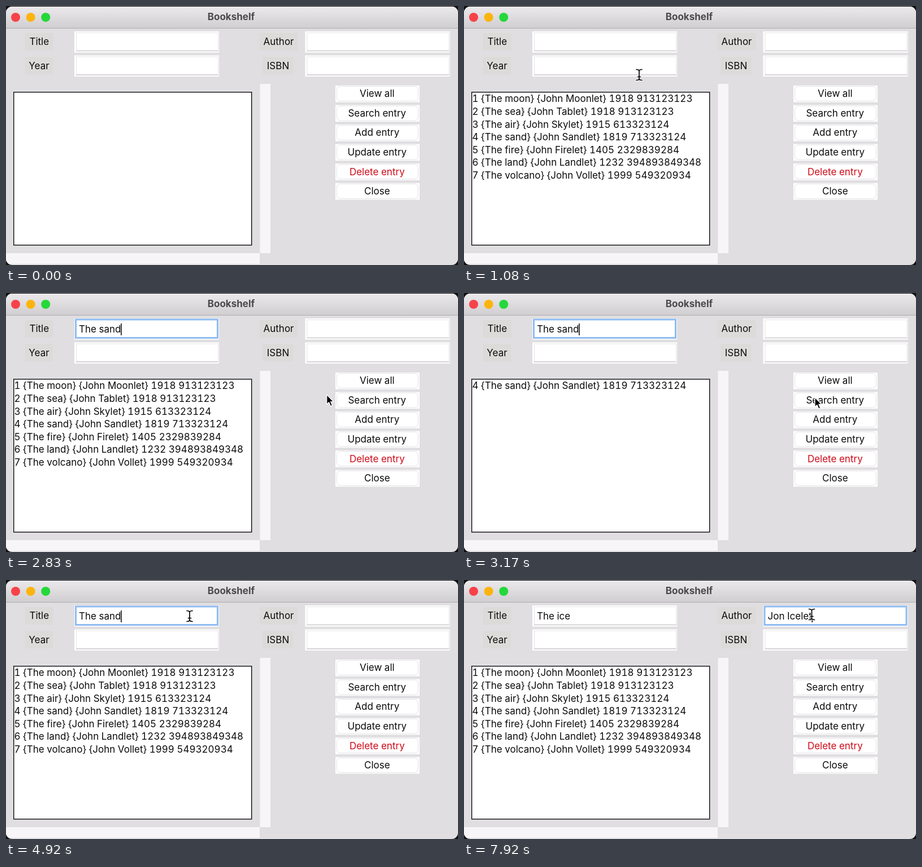
Animation, 800 px wide and 459 px high, one loop 8000 ms. Source, as an HTML page:

```html
<!DOCTYPE html>
<html lang="en">
<head>
<meta charset="utf-8">
<title>Bookshelf</title>
<style>
  html, body { margin: 0; width: 100%; height: 100%; overflow: hidden; background: #111; }
  svg { display: block; width: 800px; height: 459px; }
  text {
    font: 17px Inter, "Open Sans", sans-serif;
    font-variant-numeric: tabular-nums;
    font-feature-settings: "calt" 0;
    fill: #0b0b0b;
    white-space: pre;
  }
  .mid { text-anchor: middle; }
  .title { font-weight: 700; fill: #4b494b; }
  .danger { fill: #cf0a18; }
</style>
</head>
<body>
<svg id="stage" viewBox="0 0 800 459">
  <defs>
    <linearGradient id="bar" x2="0" y2="1">
      <stop offset="0" stop-color="#ebe9eb"/>
      <stop offset="1" stop-color="#d0ced0"/>
    </linearGradient>
    <clipPath id="frame"><rect y="1" width="800" height="458" rx="11"/></clipPath>
  </defs>
</svg>
<script>
const NS = "http://www.w3.org/2000/svg";
const stage = document.getElementById("stage");
const LOOP = 8000, STEP = 1000 / 12;

function add(parent, tag, attrs, content) {
  const el = document.createElementNS(NS, tag);
  for (const key in attrs) el.setAttribute(key, attrs[key]);
  if (content !== undefined) el.textContent = content;
  parent.appendChild(el);
  return el;
}
const rect = (parent, x, y, width, height, fill, more) =>
  add(parent, "rect", { x, y, width, height, fill, ...more });
const label = (parent, x, y, content, cls = "") =>
  add(parent, "text", { x, y, class: cls }, content);
const show = (el, on) => el.setAttribute("visibility", on ? "visible" : "hidden");

// Window
const win = add(stage, "g", { "clip-path": "url(#frame)" });
rect(win, 0, 0, 800, 459, "#e0dee1");
rect(win, 0, 1, 800, 38, "url(#bar)");
rect(win, 0, 39, 800, 1, "#aeacae");
["#f7424a", "#fcb40d", "#24d83a"].forEach((fill, i) =>
  add(win, "circle", { cx: 17 + i * 26.6, cy: 20, r: 8, fill }));
label(win, 398.5, 25, "Bookshelf", "mid title");

// Form
function makeField(x, y, name, cx, half) {
  rect(win, cx - half, y + 3, half * 2, 31, "#dddbd9");
  label(win, cx, y + 24.3, name, "mid");
  rect(win, x, y, 256, 37.5, "#fff");
  const plain = add(win, "g", {});
  rect(plain, x + 3.5, y + 2.5, 251, 32, "none", { stroke: "#e7e5e7" });
  rect(plain, x + 3, y + 34, 252, 1, "#bab8ba");
  const ring = rect(win, x + 2.5, y + 2, 251, 32.5, "#fff",
    { stroke: "#8fbcf2", "stroke-width": 3 });
  const text = label(win, x + 8, y + 25.3, "");
  const caret = rect(win, 0, y + 9, 1.5, 21, "#000");
  return {
    draw(value, focused, caretOn) {
      text.textContent = value;
      show(plain, !focused);
      show(ring, focused);
      show(caret, focused && caretOn);
      const end = value ? text.getComputedTextLength() : 0;
      caret.setAttribute("x", x + 7.7 + end);
    }
  };
}
const titleField = makeField(121, 45, "Title", 58.8, 25);
const authorField = makeField(529.5, 45, "Author", 482.5, 34);
const yearField = makeField(121, 87.5, "Year", 58.5, 25);
const isbnField = makeField(529.5, 87.5, "ISBN", 481.5, 27);
yearField.draw("", false, false);
isbnField.draw("", false, false);

// List and scroll bars
rect(win, 449.5, 138, 18.5, 300, "#f7f5f7");
rect(win, 0, 438, 449, 19, "#f7f5f7");
rect(win, 13.7, 152.7, 421, 271, "#fff", { stroke: "#0b0b0b", "stroke-width": 1.4 });
const books = [
  "1 {The moon} {John Moonlet} 1918 913123123",
  "2 {The sea} {John Tablet} 1918 913123123",
  "3 {The air} {John Skylet} 1915 613323124",
  "4 {The sand} {John Sandlet} 1819 713323124",
  "5 {The fire} {John Firelet} 1405 2329839284",
  "6 {The land} {John Landlet} 1232 394893849348",
  "7 {The volcano} {John Vollet} 1999 549320934"
];
const rows = books.map((_, i) => label(win, 14.5, 170.3 + i * 22.6, ""));

// Buttons
["View all", "Search entry", "Add entry", "Update entry", "Delete entry", "Close"]
  .forEach((name, i) => {
    const y = 141 + i * 34.55;
    rect(win, 583, y, 149, 29.5, "#fff");
    rect(win, 585.5, y + 1.5, 144, 26, "none", { rx: 6, stroke: "#e4e2e4" });
    label(win, 656.8, y + 20.3, name, "mid" + (name.startsWith("Delete") ? " danger" : ""));
  });

// Pointers
const arrow = add(stage, "path", {
  d: "M0 0V17L3.9 13.4L6.9 20.2L9.8 18.9L6.9 12.2H12Z",
  fill: "#000", stroke: "#fff", "stroke-width": 1.3, "stroke-linejoin": "round"
});
const beam = add(stage, "g", { fill: "none", "stroke-linecap": "round" });
[["#fff", 3.6], ["#000", 1.7]].forEach(([stroke, width]) =>
  add(beam, "path", {
    d: "M-5 -9.5Q0 -9.5 0 -6.5Q0 -9.5 5 -9.5M0 -6.5V6.5M-5 9.5Q0 9.5 0 6.5Q0 9.5 5 9.5M-2.5 3.5H2.5",
    stroke, "stroke-width": width
  }));

// Pointer stops: step, x, y
const path = [
  [1, 742, 423], [4, 705, 290], [8, 660, 158], [11, 650, 152], [13, 310, 122],
  [16, 249, 50], [28, 249, 50], [33, 541, 178], [36, 621, 185], [41, 621, 185],
  [46, 622, 201], [48, 624, 198], [50, 645, 154], [52, 645, 154], [57, 330, 67],
  [59, 325, 64], [74, 325, 64], [76, 450, 84], [78, 615.5, 61], [96, 615.5, 61]
];
function pointerAt(n) {
  const i = Math.max(1, path.findIndex(p => p[0] >= n));
  const [a, ax, ay] = path[i - 1], [b, bx, by] = path[i];
  const u = (n - a) / (b - a);
  return [ax + (bx - ax) * u, ay + (by - ay) * u];
}
const inField = (x, y) => y > 45 && y < 125 &&
  ((x > 121 && x < 377) || (x > 529 && x < 785));

// Each table holds [first step, value]
const titleSteps = [
  [0, ""], [19, "T"], [20, "Th"], [21, "The"], [22, "The "], [24, "The s"],
  [25, "The sa"], [26, "The san"], [27, "The sand"], [62, "The san"], [63, "The sa"],
  [64, "The s"], [65, "The "], [72, "The i"], [73, "The ic"], [74, "The ice"]
];
const authorKeys = [82, 83, 84, 85, 87, 88, 89, 90, 91, 93];
const listSteps = [[0, []], [10, books], [38, [books[3]]], [52, books]];
const focusSteps = [[0, ""], [17, "title"], [79, "author"]];
const caretSteps = [
  [0, true], [31, false], [34, true], [43, false], [46, true],
  [54, false], [58, true], [67, false], [68, true], [70, false], [72, true]
];
const valueAt = (table, n) => table.filter(s => s[0] <= n).pop()[1];

function draw(n) {
  const focus = valueAt(focusSteps, n);
  const caretOn = valueAt(caretSteps, n);
  titleField.draw(valueAt(titleSteps, n), focus === "title", caretOn);
  const typed = authorKeys.filter(k => k <= n).length;
  authorField.draw("Jon Icelet".slice(0, typed), focus === "author", caretOn);

  const list = valueAt(listSteps, n);
  rows.forEach((row, i) => row.textContent = list[i] || "");

  const [x, y] = pointerAt(n);
  const text = inField(x, y);
  show(arrow, n > 0 && !text);
  show(beam, n > 0 && text);
  (text ? beam : arrow).setAttribute("transform", `translate(${x} ${y})`);
}

const start = performance.now();
let last = -1;
function tick() {
  const t = (performance.now() - start) % LOOP;
  const n = Math.min(95, Math.floor((t + 4) / STEP));
  if (n !== last) draw(last = n);
  requestAnimationFrame(tick);
}
tick();
</script>
</body>
</html>
```
